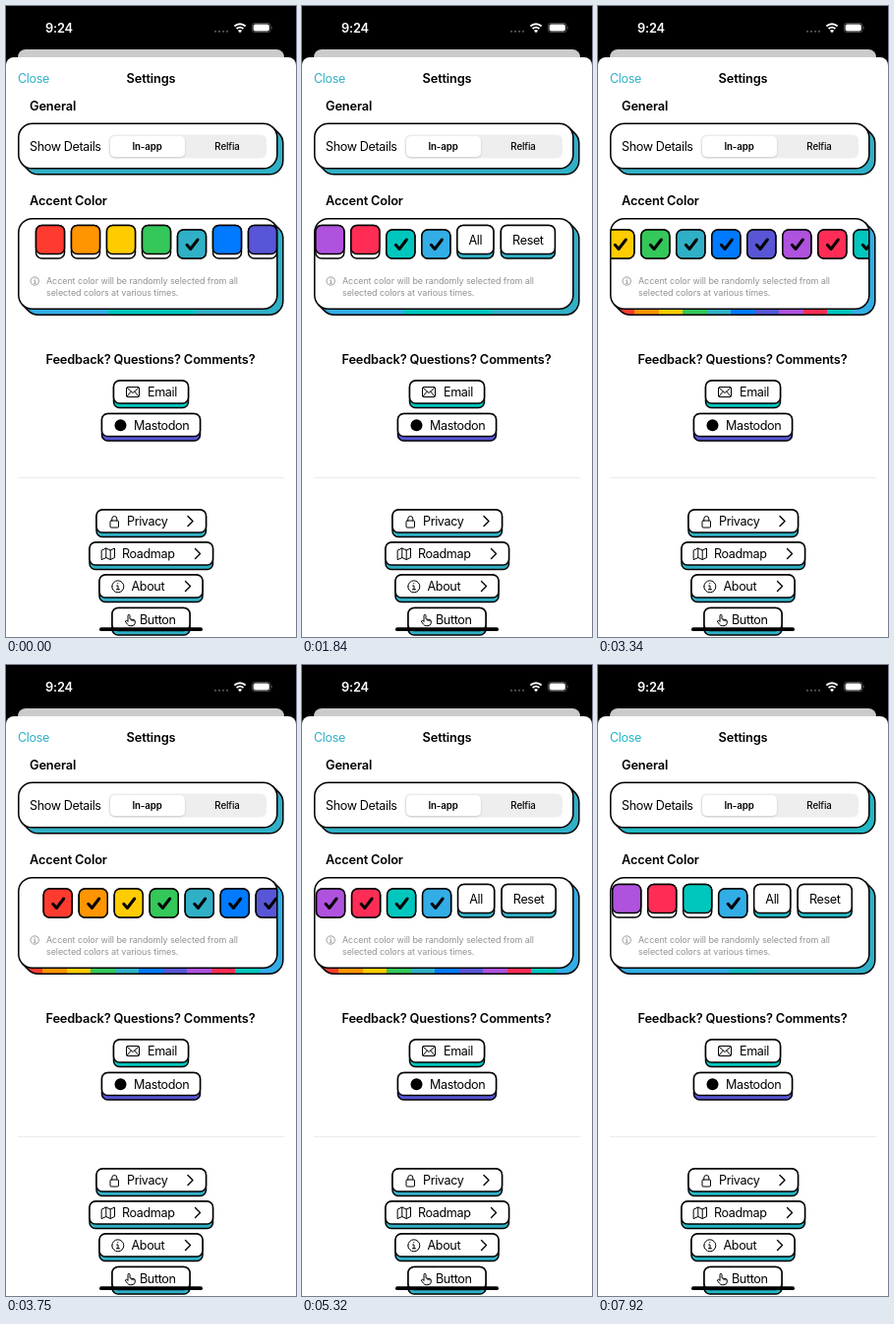
These frames come from a looping animation (295x640 px, 8 s). An HTML page:

```html
<!DOCTYPE html>
<html lang="en">
<head>
<meta charset="utf-8">
<title>Settings</title>
<style>
  html, body { margin: 0; width: 100%; height: 100%; overflow: hidden; background: #000; }
  svg { display: block; width: 100%; height: 100%; --accent: #30b0c7; }
  text { font: 400 12.6px Inter, sans-serif; letter-spacing: -.03em; }
  .bold { font-size: 12.8px; font-weight: 600; letter-spacing: -.012em; }
  .segment { font-size: 9.7px; font-weight: 500; letter-spacing: -.01em; text-anchor: middle; }
  .note { font-size: 9px; letter-spacing: -.01em; fill: #929296; }
  .middle { text-anchor: middle; }
  .accent { fill: var(--accent); }
  .edge { stroke: #000; stroke-width: 1.5; }
  .icon { fill: none; stroke: #000; stroke-width: 1; stroke-linecap: round; stroke-linejoin: round; }
  .check { fill: none; stroke: #000; stroke-width: 3; stroke-linecap: round; stroke-linejoin: round; }
</style>
</head>
<body>
<svg id="stage" viewBox="0 0 295 640"></svg>
<script>
const COLORS = ['#ff3b30', '#ff9500', '#ffcc00', '#34c759', '#30b0c7', '#007aff',
                '#5856d6', '#af52de', '#ff2d55', '#00c7be', '#32ade6'];
const TEAL = 4, INDIGO = 6, MINT = 9, SKY = 10;
const LOOP = 8000, PITCH = 36, DEPTH = 4.5, LEFT_REST = 30.5, RIGHT_REST = -237.3;

// Selections in the order of the stripes, and the accent that goes with them.
const ALL = COLORS.map((_, i) => i);
const STATES = [
  { at: -LOOP, picked: [SKY, MINT, TEAL], accent: TEAL },
  { at: 2380, picked: ALL, accent: TEAL },
  { at: 6450, picked: [SKY, MINT, TEAL], accent: MINT },
  { at: 7700, picked: [SKY, TEAL], accent: TEAL },
];
const FLICKS = [
  { at: 990, time: 410, from: LEFT_REST, peak: -263.5, rest: RIGHT_REST },
  { at: 3090, time: 450, from: RIGHT_REST, peak: 58, rest: LEFT_REST },
  { at: 4250, time: 410, from: LEFT_REST, peak: -263.5, rest: RIGHT_REST },
];

const clamp = v => Math.max(0, Math.min(1, v));
const ease = v => { v = clamp(v); return v * v * (3 - 2 * v); };
const mix = (a, b, p) => a + (b - a) * p;
const mixColor = (a, b, p) => 'rgb(' + [1, 3, 5].map(i =>
  Math.round(mix(parseInt(a.substr(i, 2), 16), parseInt(b.substr(i, 2), 16), p))) + ')';

const rect = (x, y, w, h, r, attrs) =>
  `<rect x="${x}" y="${y}" width="${w}" height="${h}" rx="${r}" ${attrs}/>`;
const text = (x, y, label, cls = '') => `<text x="${x}" y="${y}" class="${cls}">${label}</text>`;
const icon = (x, y, d) => `<path class="icon" transform="translate(${x} ${y})" d="${d}"/>`;

// Side of a rounded box pushed back diagonally by d.
function extrusion(x, y, w, h, r, d) {
  const k = r * Math.SQRT1_2, right = x + w, bottom = y + h, arc = `A${r} ${r} 0 0 `;
  return `M${x + r - k} ${bottom - r + k}l${d} ${d}${arc}0 ${x + r + d} ${bottom + d}
    H${right - r + d}${arc}0 ${right + d} ${bottom - r + d}V${y + r + d}
    ${arc}0 ${right - r + k + d} ${y + r - k + d}l${-d} ${-d}Z`;
}

function button(x, y, w, label, labelX, art, side = 'class="edge accent"') {
  return rect(x, y, w, 23 + DEPTH, 6, side) + rect(x, y, w, 23, 6, 'class="edge" fill="#fff"') +
    art + text(labelX, y + 16.3, label);
}
const chevron = (x, y) =>
  `<path class="icon" style="stroke-width:1.4" d="M${x} ${y}l5 5l-5 5"/>`;

const GENERAL = [12.8, 119.3, 263, 45.5, 14];
const CARD = [12.8, 215.7, 263, 91.5, 14];
const cardSide = extrusion(...CARD, 6);

// A face that sinks onto the base behind it.
const key = (x, w, base, face, content) => `<g class="key" transform="translate(${x} 0)">
  ${rect(0, 222.5, w, 29 + DEPTH, 6, base)}
  <g>${rect(0, 222.5, w, 29, 6, face)}${content}</g></g>`;
const swatches = COLORS.map((color, i) => key(i * PITCH, 29, 'class="edge" fill="#fff"',
  `class="edge" fill="${color}"`, '<path class="check" d="M9.5 237.8l3.7 4.2l7.3-9.5"/>')).join('');
const pushButton = (x, w, label) => key(x, w, 'class="edge accent"',
  'class="edge" fill="#fff"', text(w / 2, 241.5, label, 'middle'));

const stage = document.getElementById('stage');
stage.innerHTML = `
  <defs>
    <clipPath id="cardClip">${rect(...CARD, '')}</clipPath>
    <clipPath id="sideClip"><path d="${cardSide}"/></clipPath>
    <filter id="soft" x="-10%" y="-20%" width="120%" height="150%">
      <feDropShadow dx="0" dy="1" stdDeviation="1.2" flood-opacity=".16"/></filter>
  </defs>
  <rect width="295" height="640"/>
  <text x="40" y="26.5" class="bold" fill="#fff">9:24</text>
  ${[213, 217, 221, 225].map(x => `<circle cx="${x}" cy="25.8" r="1.1" fill="#555"/>`).join('')}
  <g fill="none" stroke="#fff" stroke-width="1.9">
    <path d="M232.4 20.5a8 8 0 0 1 11.2 0M234.6 23a5 5 0 0 1 6.8 0"/></g>
  <path fill="#fff" d="M236 25a3 3 0 0 1 4 0l-2 2.2z"/>
  ${rect(250.3, 17.4, 18.8, 9.2, 3, 'fill="none" stroke="#666" stroke-width=".8"')}
  ${rect(251.6, 18.6, 16.2, 6.8, 1.9, 'fill="#fff"')}
  <path d="M270.2 20.5q1.4 1.5 0 3z" fill="#777"/>
  ${rect(12, 44, 271, 30, 8, 'fill="#cbcbcb"')}
  <path d="M0 640V60a8 8 0 0 1 8-8h279a8 8 0 0 1 8 8v580z" fill="#fff"/>
  ${text(12, 77.5, 'Close', 'accent')}
  ${text(147.5, 77.5, 'Settings', 'bold middle')}
  ${text(24, 106.3, 'General', 'bold')}

  <path class="edge accent" d="${extrusion(...GENERAL, 6)}"/>
  ${rect(...GENERAL, 'class="edge" fill="#fff"')}
  ${text(24, 147, 'Show Details')}
  ${rect(104.5, 130.5, 160.5, 24, 6, 'fill="#eeeeef"')}
  ${rect(106, 132, 76, 21, 5, 'fill="#fff" filter="url(#soft)"')}
  <text x="143.5" y="146" class="segment" style="font-weight:600">In-app</text>
  ${text(225, 146, 'Relfia', 'segment')}

  ${text(24, 202.3, 'Accent Color', 'bold')}
  <path class="accent" d="${cardSide}"/>
  <g id="stripes" clip-path="url(#sideClip)" shape-rendering="crispEdges"></g>
  <path class="edge" fill="none" d="${cardSide}"/>
  ${rect(...CARD, 'fill="#fff"')}
  <g clip-path="url(#cardClip)"><g id="strip">${swatches}
    ${pushButton(396, 37, 'All')}${pushButton(440.5, 55, 'Reset')}</g></g>
  ${rect(...CARD, 'class="edge" fill="none"')}
  <g fill="none" stroke="#929296" stroke-width=".9"><circle cx="29.2" cy="279" r="4.2"/>
    <path d="M28.4 278.3h1v3M28.2 281.3h2.2M29.2 276.2v1"/></g>
  ${text(41, 282.3, 'Accent color will be randomly selected from all', 'note')}
  ${text(41, 294, 'selected colors at various times.', 'note')}

  ${text(147, 362.6, 'Feedback? Questions? Comments?', 'bold middle')}
  ${button(109.5, 380, 76, 'Email', 144,
    icon(122.5, 386.5, 'M1.5 0h10q1.5 0 1.5 1.5v7q0 1.5-1.5 1.5h-10q-1.5 0-1.5-1.5v-7q0-1.5 1.5-1.5M.5.5l6 5.5l6-5.5M.5 9.5l4.3-5M12.5 9.5l-4.3-5'),
    `class="edge" fill="${COLORS[MINT]}"`)}
  ${button(97.5, 413.5, 100, 'Mastodon', 130, '<circle cx="116.5" cy="425.3" r="6"/>',
    `class="edge" fill="${COLORS[INDIGO]}"`)}
  <path d="M12 478.5H283" stroke="#ebebed" stroke-width="1"/>
  ${button(92, 511, 111.5, 'Privacy', 123,
    icon(106, 517, 'M1 5h6.5q1 0 1 1v5q0 1-1 1h-6.5q-1 0-1-1v-5q0-1 1-1M1.8 5v-2a2.5 2.5 0 0 1 5 0v2') +
    chevron(185, 517.5))}
  ${button(85, 544, 125.5, 'Roadmap', 118,
    icon(97.5, 550, 'M0 2l4.3-2l4.4 2l4.3-2v9.5l-4.3 2l-4.4-2l-4.3 2zM4.3 0v9.5M8.7 2v9.5') +
    chevron(192.5, 550.5))}
  ${button(95, 577, 105, 'About', 127.5,
    icon(113.8, 588.8, 'M-6 0a6 6 0 0 1 12 0a6 6 0 0 1-12 0M-1.2-.8h1.4v3.8M-1.5 3h3.2M0-3.3v.3') +
    chevron(182.5, 583.5))}
  ${button(108, 610.5, 79, 'Button', 136,
    icon(121, 616.5, 'M3 7.5v-5.7a1 1 0 0 1 2 0v3.5l4 .9q1.6.4 1.5 2q0 4-3.5 4h-1.7q-1.7 0-2.8-1.6l-2.3-3q.7-1.6 2.8-.1M7 5.8v1.4M9 6.3v1.2'))}
  ${rect(95, 630.3, 105, 3.8, 1.9, '')}`;

const strip = document.getElementById('strip');
const stripes = document.getElementById('stripes');
const keys = [...strip.querySelectorAll('.key')];
const checks = [...strip.querySelectorAll('.check')];
const [allButton, resetButton] = keys.slice(-2);

// A fast flick past the end, then a damped return.
function scrollAt(t) {
  const flick = FLICKS.filter(f => f.at <= t).pop();
  if (!flick) return LEFT_REST;
  const { at, time, from, peak, rest } = flick, age = t - at;
  if (age < time) return mix(from, peak, ease(age / time));
  const damp = (age - time) * .012;
  return mix(rest, peak, (1 + damp) * Math.exp(-damp));
}

// Kept stripes slide over those that fade in or out.
function drawStripes(before, after, p) {
  const span = (list, color) => {
    const width = 270 / list.length;
    return [12.5 + list.indexOf(color) * width, width];
  };
  const faded = [], kept = [];
  for (const i of new Set([...before, ...after])) {
    const was = before.includes(i), is = after.includes(i);
    const [x0, w0] = span(was ? before : after, i), [x1, w1] = span(is ? after : before, i);
    const opacity = mix(+was, +is, p);
    (was && is ? kept : faded).push(rect(mix(x0, x1, p), 210, mix(w0, w1, p), 106, 0,
      `fill="${COLORS[i]}" opacity="${opacity}"`));
  }
  stripes.innerHTML = faded.concat(kept).join('');
}

const press = (t, at) => ease((t - at) / 70) * (1 - ease((t - at - 110) / 110));

function sink({ children: [base, face] }, amount) {
  const y = amount * DEPTH;
  base.setAttribute('y', 222.5 + y);
  base.setAttribute('height', 29 + DEPTH - y);
  face.setAttribute('transform', `translate(0 ${y})`);
}

function draw(now) {
  const t = now % LOOP;
  const index = STATES.filter(s => s.at <= t).length - 1;
  const state = STATES[index], last = STATES[Math.max(0, index - 1)];
  const fade = ease((t - state.at) / 350), snap = ease((t - state.at) / 160);

  stage.style.setProperty('--accent', mixColor(COLORS[last.accent], COLORS[state.accent], fade));
  drawStripes(last.picked, state.picked, fade);
  strip.setAttribute('transform', `translate(${scrollAt(t)} 0)`);
  checks.forEach((check, i) => {
    const on = mix(+last.picked.includes(i), +state.picked.includes(i), snap);
    sink(keys[i], on);
    check.setAttribute('opacity', on);
  });
  sink(allButton, press(t, 2270));
  sink(resetButton, press(t, 6340));
}

function tick() {
  draw(performance.now());
  requestAnimationFrame(tick);
}
tick();
</script>
</body>
</html>
```
